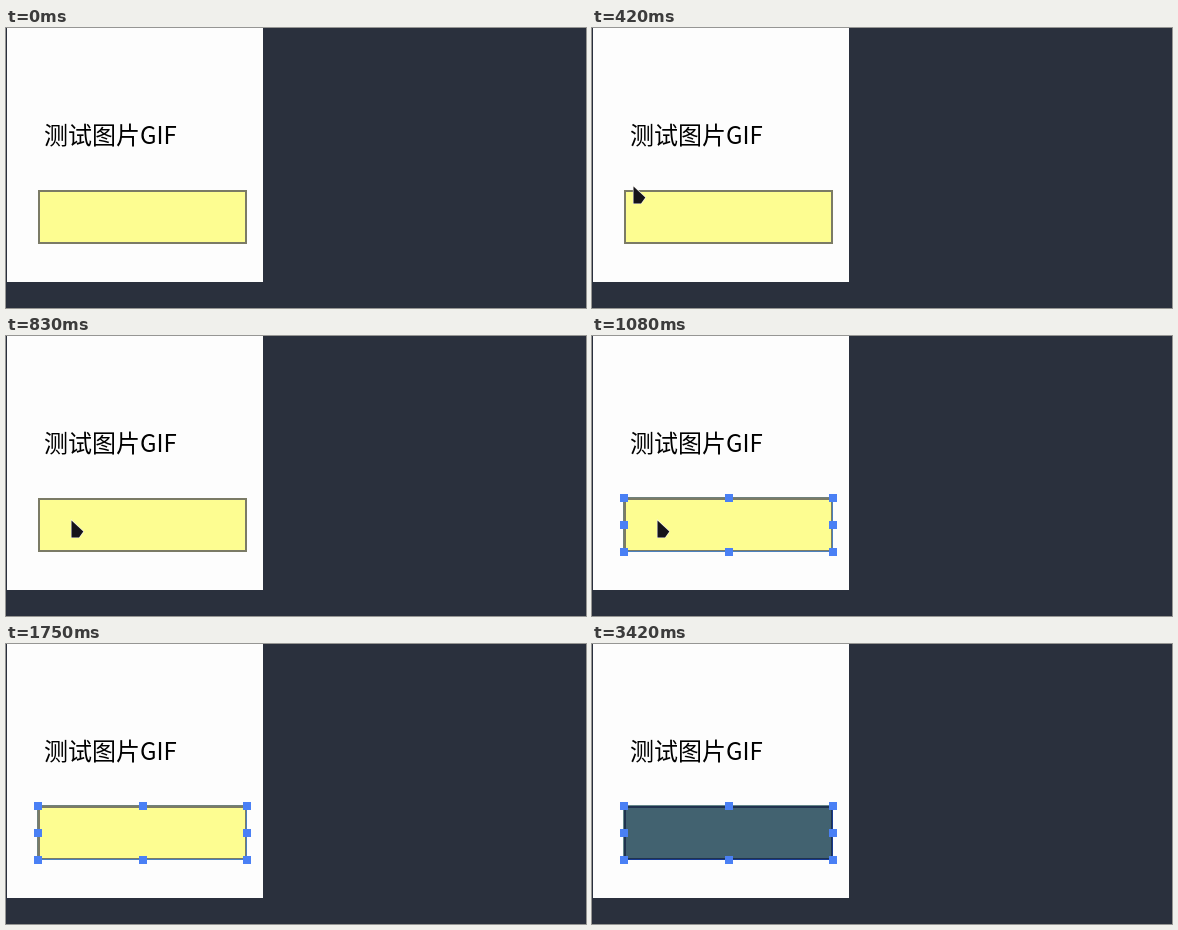
Write an HTML page that moves like this. It is 580 by 280 pixels and loops after 5.26 s.

```html
<!DOCTYPE html>
<html lang="zh">
<head>
<meta charset="utf-8">
<style>
  html, body { margin: 0; width: 100%; height: 100%; overflow: hidden; background: #2a303d; }
  svg { display: block; }
  text { font: 24px "Noto Sans CJK SC", "Noto Sans CJK", "Noto Sans CJK JP", sans-serif; }
</style>
</head>
<body>
<svg width="580" height="280" viewBox="0 0 580 280">
  <rect width="580" height="280" fill="#2a303d"/>
  <rect x="1" width="256" height="254" fill="#fdfdfd"/>
  <text x="38" y="116" fill="#000">测试图片GIF</text>
  <rect id="box" x="33" y="163" width="207" height="52" stroke-width="2"/>
  <g id="selection">
    <path id="topLeft" d="M31.5 216V161.5H241" fill="none"/>
    <path id="bottomRight" d="M33 215.5H240.5V162" fill="none"/>
    <g id="handles" fill="#4a80f5"></g>
  </g>
  <path id="cursor" d="M.5 .5V17.5H8L12.3 11.6Z" fill="#15131a" stroke="#f4f2ec" stroke-width="1.2" paint-order="stroke"/>
</svg>
<script>
  const LOOP = 5260, ENTER = 165, STEP = 82.5, STEPS = 8;
  const SELECT = 1080, LEAVE = 1670, GONE = 1750, RECOLOR = 3250;
  const $ = id => document.getElementById(id);
  const box = $('box'), selection = $('selection'), cursor = $('cursor');
  const show = (el, on) => el.setAttribute('visibility', on ? 'visible' : 'hidden');

  for (const y of [158, 185, 212])
    for (const x of [28, 133, 237]) {
      if (x === 133 && y === 185) continue;
      const handle = document.createElementNS('http://www.w3.org/2000/svg', 'rect');
      for (const [key, value] of Object.entries({ x, y, width: 8, height: 8 }))
        handle.setAttribute(key, value);
      $('handles').append(handle);
    }

  // The pointer glides in with decreasing speed, sampled in steps.
  function pointerAt(t) {
    if (t >= LEAVE) return [18, 216];
    const k = Math.min(STEPS, Math.max(0, Math.floor((t - ENTER) / STEP)));
    const rest = (1 - k / STEPS) ** 2;
    return [Math.round(65 - 61.4 * rest), Math.round(184 - 66.6 * rest)];
  }

  function draw(t) {
    const dark = t >= RECOLOR;
    box.setAttribute('fill', dark ? '#426270' : '#fdfd91');
    box.setAttribute('stroke', dark ? '#20334f' : '#7b7b66');
    $('topLeft').setAttribute('stroke', dark ? '#65868a' : '#70817c');
    $('bottomRight').setAttribute('stroke', dark ? '#173a91' : '#4b80bd');
    show(selection, t >= SELECT);
    show(cursor, t >= 170 && t < GONE);
    cursor.setAttribute('transform', `translate(${pointerAt(t)})`);
  }

  function tick() {
    draw(performance.now() % LOOP);
    requestAnimationFrame(tick);
  }
  tick();
</script>
</body>
</html>
```
